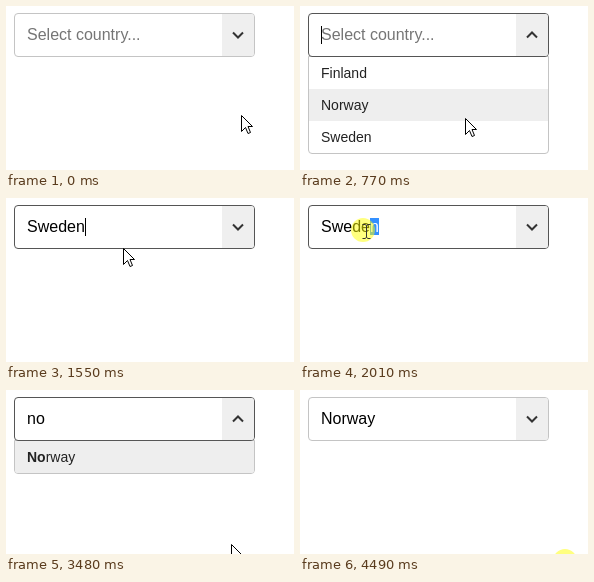
These frames come from a looping animation (288 px wide and 164 px high, 4570 ms). An HTML page:

```html
<!DOCTYPE html>
<html lang="en">
<head>
<meta charset="utf-8">
<title>Country combobox</title>
<style>
html, body { margin: 0; width: 100%; height: 100%; overflow: hidden; background: #fff; }
body { position: relative; font: 16px "Liberation Sans", Arial, sans-serif; color: #000; }
div, svg { position: absolute; box-sizing: border-box; }
#box { left: 8px; top: 7px; width: 241px; height: 44px; border: 1px solid #c4c4c4; border-radius: 4px; background: #fff; overflow: hidden; }
#box.focus { border-color: #555; }
#button { right: 0; top: 0; width: 32px; height: 42px; background: #efefef; }
#field { left: 12px; top: 12px; line-height: 18px; white-space: pre; }
#field i { display: inline-block; width: 1px; height: 18px; margin-right: -1px; background: #000; vertical-align: top; }
#field mark { background: #3390ff; color: #fff; }
#field.empty { color: #757575; }
#list { left: 8px; top: 50px; width: 241px; border: 1px solid #c4c4c4; border-radius: 0 0 4px 4px; overflow: hidden; background: #fff; }
#list p { margin: 0; padding-left: 12px; height: 32px; font-size: 14px; line-height: 32px; color: #222; }
#list p.active { background: #eee; }
#overlay { left: 0; top: 0; width: 288px; height: 164px; }
</style>
</head>
<body>
<div id="list"></div>
<div id="box"><div id="field"></div><div id="button"></div></div>
<svg id="overlay" viewBox="0 0 288 164">
  <path id="chevron" d="M-5 -2.5L0 2.5L5 -2.5" fill="none" stroke="#333" stroke-width="2"/>
  <circle id="click" r="12" fill="#ff0" fill-opacity=".5"/>
  <path id="arrow" d="M.5 .5V16.5L4.5 12.5L7 18.5L9.5 17.5L7 11.5H11.5Z" fill="#fff" stroke="#000"/>
  <path id="beam" d="M-3.5 -6.5H-1L.5 -5.5L2 -6.5H4.5M.5 -5.5V6.5M-3.5 7.5H-1L.5 6.5L2 7.5H4.5" fill="none" stroke="#333"/>
</svg>
<script>
const LOOP = 4570, TICKS = 59;
const COUNTRIES = ["Finland", "Norway", "Sweden"];
const $ = id => document.getElementById(id);

// Pointer path: [tick, x, y]
const path = [
  [0, 235, 109], [6, 225, 39], [7, 225, 39], [8, 225, 49], [10, 165, 112],
  [12, 165, 112], [13, 155, 130], [14, 155, 130], [15, 154, 133], [17, 154, 133],
  [20, 117, 50], [21, 117, 50], [23, 82, 33], [24, 80, 33], [26, 66, 33],
  [28, 15, 33], [29, 15, 33], [30, 50, 65], [33, 165, 147], [36, 225, 154],
  [53, 225, 154], [55, 233, 162], [58, 265, 171]
];

// State changes: [tick, changed properties]
const events = [
  [0, { text: "", query: "", open: false, row: -1, focus: false, caret: false, click: false, select: 99 }],
  [6, { click: true }],
  [8, { click: false, open: true, focus: true, caret: true }],
  [9, { row: 0 }],
  [10, { row: 1 }],
  [13, { row: 2, caret: false }],
  [15, { click: true }],
  [16, { focus: false }],
  [17, { click: false, focus: true, open: false, text: "Sweden", caret: true }],
  [23, { caret: false }],
  [24, { click: true }],
  [26, { select: 5 }],
  [27, { select: 2 }],
  [28, { select: 0 }],
  [30, { click: false, select: 99, text: "n", query: "n", open: true, row: 0, caret: true }],
  [36, { caret: false }],
  [38, { text: "no", query: "no", caret: true }],
  [45, { caret: false }],
  [49, { text: "Norway", open: false, caret: true }],
  [56, { caret: false }],
  [58, { focus: false, click: true }]
];

function pointerAt(tick) {
  const next = path.findIndex(p => p[0] >= tick);
  const [t1, x1, y1] = path[next];
  const [t0, x0, y0] = path[Math.max(0, next - 1)];
  const f = t1 > t0 ? (tick - t0) / (t1 - t0) : 0;
  return [Math.round(x0 + (x1 - x0) * f), Math.round(y0 + (y1 - y0) * f)];
}

function place(id, x, y, visible = true) {
  $(id).setAttribute("transform", `translate(${x} ${y})`);
  $(id).style.display = visible ? "" : "none";
}

function render(tick) {
  const s = Object.assign({}, ...events.filter(e => e[0] <= tick).map(e => e[1]));
  const caret = s.caret ? "<i></i>" : "";
  const selected = s.text.slice(s.select);

  $("box").className = s.focus ? "focus" : "";
  $("field").className = s.text ? "" : "empty";
  $("field").innerHTML = s.text
    ? s.text.slice(0, s.select) + (selected && `<mark>${selected}</mark>`) + caret
    : caret + "Select country...";

  const match = new RegExp(s.query || "$^", "gi");
  $("list").style.display = s.open ? "" : "none";
  $("list").innerHTML = COUNTRIES
    .filter(c => c.toLowerCase().includes(s.query))
    .map((c, i) => `<p class="${i === s.row ? "active" : ""}">${c.replace(match, "<b>$&</b>")}</p>`)
    .join("");

  $("chevron").setAttribute("transform", `translate(232 29) scale(1 ${s.open ? -1 : 1})`);

  const [x, y] = pointerAt(tick);
  const overText = x < 216 && y < 50;
  place("arrow", x, y, !overText);
  place("beam", x, y, overText);
  place("click", overText ? x - 3 : x, overText ? y - 1 : y, s.click);
}

let shown = -1;
function loop() {
  const t = performance.now() % LOOP;
  const tick = Math.min(TICKS - 1, Math.floor(t / LOOP * TICKS + 0.18));
  if (tick !== shown) render(shown = tick);
  requestAnimationFrame(loop);
}
loop();
</script>
</body>
</html>
```
